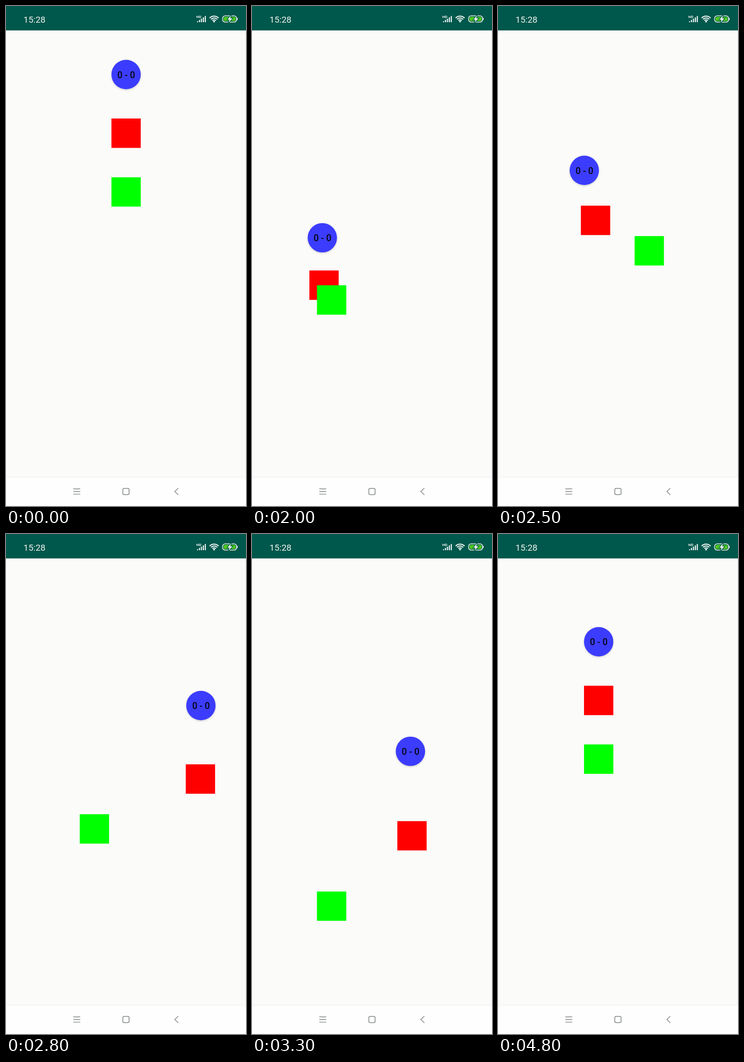
These frames come from a looping animation (519x1080 px, 4900 ms). An HTML page with a canvas:

```html
<!DOCTYPE html>
<html lang="en">
<head>
<meta charset="utf-8">
<title>Followers</title>
<style>
  html, body { margin: 0; width: 100%; height: 100%; overflow: hidden; background: #fbfbfa; }
  canvas { display: block; width: 519px; height: 1080px; }
</style>
</head>
<body>
<canvas id="stage" width="519" height="1080"></canvas>
<script>
const ctx = document.getElementById('stage').getContext('2d');
const LOOP = 4900, STEP = 100, LAG = 30;
const SIDE = 63.4, HOME_X = 259.7, HOME_Y = 148, GAP = 126.8;
const END_X = -42, END_Y = 84.7;

// Turning points of each swing: [ms, offset from the resting place]
const drag = {
  x: [[1520, 0], [2050, -110], [2290, 101], [2550, -90], [2786, 163.6],
      [3050, -100], [3272, 86.3], [3570, -70], [3720, END_X]],
  y: [[1557, 0], [2140, 408], [2400, 168], [2680, 306], [2920, 139],
      [3190, 448], [3480, 46], [3720, END_Y]]
};
const trail = {
  x: [[1590, 0], [2150, -105], [2460, 75], [2750, -88.4], [3000, 120],
      [3230, -118], [3480, 50], [3820, -55.2], [4130, -41], [4400, END_X]],
  y: [[1590, 0], [2230, 327], [2560, 110], [2860, 248.6], [3090, 140],
      [3310, 403.6], [3765, 39.5], [4110, 93.5], [4400, END_Y]]
};

// Half a cosine wave from one turning point to the next
function swing(turns, t) {
  const i = turns.findIndex(p => p[0] > t);
  if (i < 0) return turns.at(-1)[1];
  if (i === 0) return turns[0][1];
  const [t0, a] = turns[i - 1], [t1, b] = turns[i];
  return a + (b - a) * (1 - Math.cos(Math.PI * (t - t0) / (t1 - t0))) / 2;
}

const place = (path, t, row) => [
  HOME_X + swing(path.x, t),
  HOME_Y + GAP * row + swing(path.y, t)
];

function stroke(color, width, path) {
  ctx.strokeStyle = color;
  ctx.lineWidth = width;
  ctx.beginPath();
  path();
  ctx.stroke();
}

function poly(points) {
  points.forEach(([x, y], i) => i ? ctx.lineTo(x, y) : ctx.moveTo(x, y));
}

function rect(color, x, y, w, h, r = 0) {
  ctx.fillStyle = color;
  ctx.beginPath();
  ctx.roundRect(x, y, w, h, r);
  ctx.fill();
}

function text(str, x, y, font, color, align = 'left') {
  ctx.font = font;
  ctx.fillStyle = color;
  ctx.textAlign = align;
  ctx.fillText(str, x, y);
}

function statusBar() {
  const bar = '#00574b', ink = '#eef5f3';
  rect(bar, 0, 0, 519, 52.7);
  text('15:28', 37.8, 35.9, '19.1px Roboto, sans-serif', ink);
  text('HD', 411.6, 25.6, 'bold 8px Roboto, sans-serif', ink);
  for (let i = 0; i < 5; i++) {
    const h = 2.2 + 2.8 * i;
    rect(ink, 413 + i * 4.2, 35 - h, 2.4, h, 0.6);
  }

  ctx.lineCap = 'butt';
  for (let r = 5.2; r < 14; r += 4) {
    stroke(ink, 2.3, () => ctx.arc(450, 35, r, -Math.PI * 0.76, -Math.PI * 0.24));
  }
  rect(ink, 448, 31.6, 4, 4, 2);

  stroke(ink, 1.6, () => ctx.roundRect(468.3, 21.3, 30.4, 13.4, 5.5));
  rect(ink, 499, 25.5, 1.8, 5, 0.8);
  rect('#4fc71f', 470.4, 23.4, 26.2, 9.2, 3.4);
  stroke(bar, 2.6, () => {
    poly([[486.4, 20.5], [479, 29.4], [483.4, 29.4], [481.6, 35.6], [489.4, 26.8], [484.8, 26.8]]);
    ctx.closePath();
  });
  ctx.fillStyle = '#fff';
  ctx.fill();
}

function navBar() {
  const ink = '#7b7f7f', mid = 1048.7;
  rect('#fefefe', 0, 1018, 519, 62);
  rect('#f0f0f0', 0, 1017.5, 519, 1);
  ctx.lineCap = ctx.lineJoin = 'round';
  for (const dy of [-5.7, 0, 5.7]) {
    stroke(ink, 1.4, () => poly([[146, mid + dy], [160, mid + dy]]));
  }
  stroke(ink, 1.5, () => ctx.roundRect(252.6, mid - 6.8, 13.6, 13.6, 3));
  stroke(ink, 1.4, () => poly([[372.3, mid - 7], [365, mid], [372.3, mid + 7]]));
  ctx.lineJoin = 'miter';
}

function box(color, [x, y], r = 0) {
  rect(color, x - SIDE / 2, y - SIDE / 2, SIDE, SIDE, r);
}

function ball([x, y]) {
  ctx.save();
  ctx.shadowColor = 'rgba(0,0,0,.2)';
  ctx.shadowBlur = 4;
  ctx.shadowOffsetY = 1.5;
  box('#3c3cff', [x, y], SIDE / 2);
  ctx.restore();
  text('0 - 0', x + 0.3, y + 7.6, '500 19.5px Roboto, sans-serif', '#050510', 'center');
}

function draw(t) {
  rect('#fbfbfa', 0, 0, 519, 1080);
  rect('#eef6ea', 518, 53, 1, 965);
  statusBar();
  navBar();
  box('#f00', place(drag, t - LAG, 1));
  box('#0f0', place(trail, t, 2));
  ball(place(drag, t, 0));
}

const start = performance.now();
function tick() {
  const t = (performance.now() - start) % LOOP;
  draw(Math.floor(t / STEP) * STEP);
  requestAnimationFrame(tick);
}
tick();
</script>
</body>
</html>
```
